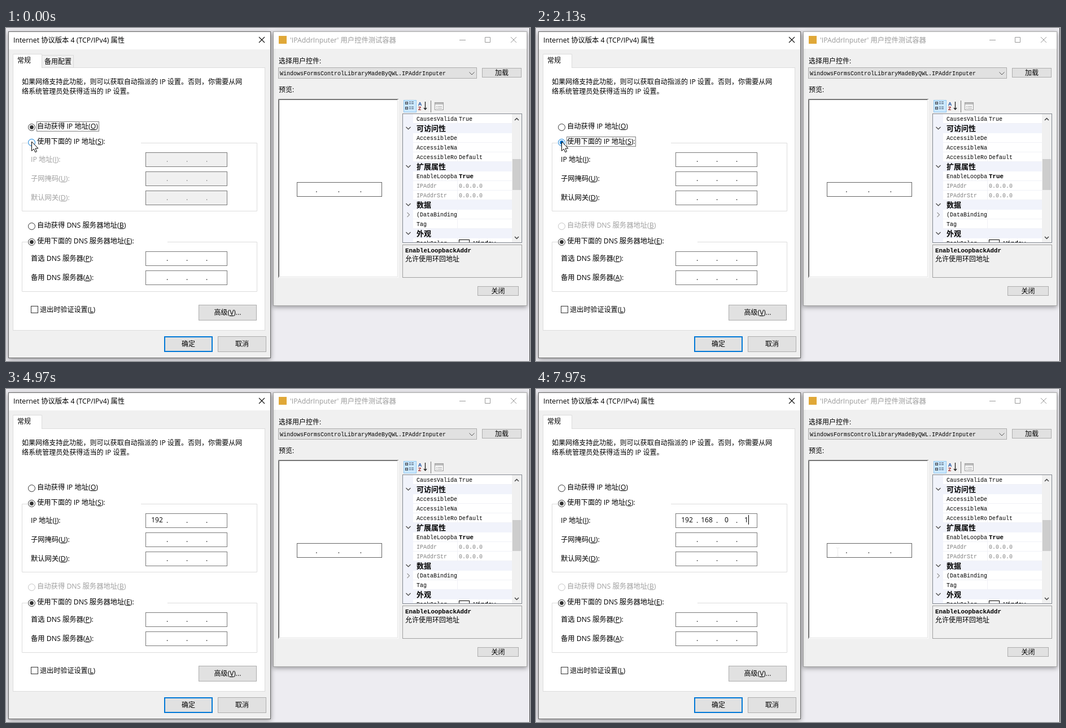
Recreate the animation shown at these times as an HTML page. Size 928 px wide and 592 px high, loop 8 s.

```html
<!DOCTYPE html>
<html lang="zh-CN">
<head>
<meta charset="utf-8">
<title>IP 设置</title>
<style>
  html, body { margin: 0; width: 100%; height: 100%; overflow: hidden; background: #edecf1; }
  svg { display: block; }
  text { font-family: "Open Sans", "Noto Sans CJK SC", "Noto Sans CJK", sans-serif; white-space: pre; }
  .mono { font-family: "Liberation Mono", "Noto Sans CJK SC", "Noto Sans CJK", monospace; }
  .u { text-decoration: underline; }
  .window { filter: drop-shadow(0 2px 4px #0006); }
</style>
</head>
<body>
<svg id="stage" width="928" height="592" viewBox="0 0 928 592"></svg>
<script>
const stage = document.getElementById('stage');
const ACCENT = '#0078d7', GREY = '#a0a0a0';

// Boxes are given by their outer pixel edges; strokes lie on pixel centres.
const fill = (x, y, w, h, color, extra = '') =>
  `<rect x="${x}" y="${y}" width="${w}" height="${h}" fill="${color}" ${extra}/>`;
const box = (x, y, w, h, color, stroke, extra = '') =>
  fill(x + .5, y + .5, w - 1, h - 1, color, `stroke="${stroke}" ${extra}`);
const path = (d, stroke, width = 1, extra = '') =>
  `<path d="${d}" fill="none" stroke="${stroke}" stroke-width="${width}" ${extra}/>`;

// Text is placed by its middle line; "_X" underlines X.
function label(x, middle, text, { size = 12.3, color = '#000', extra = '' } = {}) {
  const marked = text.replace(/_(\w)/g, '<tspan class="u">$1</tspan>');
  return `<text x="${x}" y="${middle + 4}" font-size="${size}" fill="${color}" ${extra}>${marked}</text>`;
}
const mono = (x, middle, text, { size = 10, color = '#000', extra = '' } = {}) =>
  label(x, middle - .5, text, { size, color, extra: 'class="mono" ' + extra });
const cjk = (x, middle, text, extra = '') =>
  label(x, middle + .5, text, { size: 12, extra });

function button(x, y, w, h, text, primary) {
  const frame = primary
    ? fill(x + 1, y + 1, w - 2, h - 2, '#e1e1e1', `stroke="${ACCENT}" stroke-width="2"`)
    : box(x, y, w, h, '#e1e1e1', '#adadad');
  return frame + label(x + w / 2, y + h / 2, text, { size: 12, extra: 'text-anchor="middle"' });
}

function radio(y, on, color = '#333') {
  return `<circle cx="45.5" cy="${y}" r="6" fill="#fff" stroke="${color}"/>` +
    (on ? `<circle cx="45.5" cy="${y}" r="3.4" fill="${color}"/>` : '');
}

const focusRect = (x, y, w, h) => box(x, y, w, h, 'none', '#000', 'stroke-dasharray="1 1"');

function ipField(y, enabled = true, parts = []) {
  const color = enabled ? '#000' : '#777';
  const middle = extra => ({ size: 12, color, extra: 'text-anchor="middle"' });
  return box(247, y, 145, 26, enabled ? '#fff' : '#f0f0f0', '#7a7a7a') +
    [285.5, 320.5, 355.5].map(x => label(x, y + 13, '.', middle())).join('') +
    parts.map((part, i) => label(267.5 + 35 * i, y + 12, part, middle())).join('');
}

function dialogFrame() {
  const group = (top, bottom, gap) =>
    path(`M38 ${top}.5H28.5V${bottom}.5H444.5V${top}.5H${gap}`, '#dcdcdc');
  return `<g class="window">${fill(4, 6, 465, 581, '#f0f0f0')}</g>` +
    box(4, 6, 465, 581, '#f0f0f0', '#666') + fill(5, 7, 463, 31, '#fff') +
    label(13, 22, 'Internet 协议版本 4 (TCP/IPv4) 属性') +
    path('M448 16l10 10m0-10l-10 10', '#111', 1.1) +
    box(12, 70, 447, 468, '#fff', '#dcdcdc') +
    path('M12.5 71V46.5H63.5V71', '#dcdcdc', 1, 'style="fill:#fff"') +
    fill(13, 69, 50, 3, '#fff') +
    label(20, 58, '常规', { size: 12 }) +
    label(28, 96, '如果网络支持此功能，则可以获取自动指派的 IP 设置。否则，你需要从网', { size: 12.06 }) +
    label(28, 113, '络系统管理员处获得适当的 IP 设置。', { size: 12.06 }) +
    group(204, 325, 239) + group(380, 468, 286) +
    label(55, 379, '使用下面的 DNS 服务器地址(_E):') + radio(380.5, true) +
    label(44, 410, '首选 DNS 服务器(_P):') + ipField(397) +
    label(44, 444, '备用 DNS 服务器(_A):') + ipField(431) +
    box(44, 494, 13, 13, '#fff', '#333') + label(60, 501, '退出时验证设置(_L)', { size: 12.1 }) +
    button(341, 492, 103, 28, '高级(_V)...') +
    button(280, 548, 86, 28, '确定', true) + button(375, 548, 86, 28, '取消');
}

function propertyGrid() {
  const rows = [
    ['CausesValida', 'True'], '可访问性', ['AccessibleDe'], ['AccessibleNa'],
    ['AccessibleRo', 'Default'], '扩展属性', ['EnableLoopba', 'True', 'bold'],
    ['IPAddr', '0.0.0.0', 'grey'], ['IPAddrStr', '0.0.0.0', 'grey'], '数据',
    ['(DataBinding'], ['Tag'], '外观', ['BackColor', '', 'swatch']
  ];
  const body = rows.map((row, i) => {
    const y = 161 + 17 * i;
    if (typeof row === 'string') {
      return fill(703, y - 8, 193, 17, '#f1f3fb') + path(`M708.5 ${y - 2}l4 4 4-4`, '#444', 1.2) +
        label(727, y + .5, row, { size: 13, extra: 'font-weight="700"' });
    }
    const [name, value = '', style] = row;
    const color = style === 'grey' ? '#808080' : '#000';
    const bold = { size: 10.83, extra: 'font-weight="700"' };
    return path(`M721 ${y + 8.5}H896M799.5 ${y - 8}V${y + 9}`, '#f0f1f7') +
      mono(727, y, name, { color }) +
      mono(802, y, value, style === 'bold' ? bold : { color }) +
      (style === 'swatch' ? box(802, y - 6, 19, 13, '#fff', '#000') + mono(828, y, 'Window', bold) : '');
  }).join('');
  return box(702, 152, 212, 230, '#fff', '#828790') +
    `<clipPath id="grid">${fill(703, 153, 193, 228, '#fff')}</clipPath>` +
    `<g clip-path="url(#grid)">${fill(703, 153, 18, 228, '#f1f3fb')}${body}</g>` +
    path('M710.5 328l4 4-4 4', '#999', 1.2) +
    fill(896, 153, 17, 228, '#f0f0f0') + fill(897, 233, 15, 55, '#cdcdcd') +
    path('M901 164l3.5-3.5 3.5 3.5M901 371l3.5 3.5 3.5-3.5', '#444', 1.5);
}

function toolbar() {
  const bullets = [133, 142].map(y => box(707, y - 2, 5, 5, '#fff', '#345') +
    path(`M708 ${y + .5}h3M714 ${y - 1.5}h3m1 0h4M714 ${y + 1.5}h3m1 0h4`, '#345')).join('');
  const letter = (y, char, color) => label(730, y, char, { size: 9, color, extra: 'font-weight="700"' });
  return box(704, 128, 23, 22, '#cce8ff', '#90c8f0') + bullets +
    letter(134, 'A', '#2458a8') + letter(142, 'Z', '#a02828') +
    path('M742.5 131V145m-2.5-3l2.5 3 2.5-3', '#222', 1.3) +
    path('M752.5 129V150', '#777') +
    box(759, 132, 16, 14, '#f4f4f4', '#a0a0a0') + fill(760, 133, 14, 3, '#bbb') +
    path('M762 139.5h2m1 0h7M762 142.5h2m1 0h7', '#aaa');
}

function testWindow() {
  return `<g class="window">${fill(473, 6, 450, 488, '#f0f0f0')}</g>` +
    box(473, 6, 450, 488, '#f0f0f0', '#aaa') + fill(474, 7, 448, 30, '#fff') +
    fill(483, 14, 14, 14, '#e0a838') +
    label(503, 22, "'IPAddrInputer' 用户控件测试容器", { color: '#999' }) +
    path('M803 21.5h11M848.5 16.5h9v9h-9zM894 16l10 10m0-10l-10 10', '#999') +
    cjk(483, 58, '选择用户控件:') +
    box(482, 70, 352, 20, '#e1e1e1', '#adadad') +
    mono(485, 80, 'WindowsFormsControlLibraryMadeByQWL.IPAddrInputer') +
    path('M820.5 78.5l4.5 4.5 4.5-4.5', '#555') +
    button(843, 71, 70, 17, '加载') +
    cjk(483, 109, '预览:') +
    fill(482, 126, 213, 318, '#fff') + path('M482.5 444V126.5H695', '#808080') +
    path('M483.5 443V127.5H694', '#696969') + path('M483 442.5H693.5V127', '#e3e3e3') +
    box(515, 274, 151, 26, '#fff', '#646464') +
    [550, 589.5, 628.5].map(x => label(x, 288, '.', { extra: 'text-anchor="middle"' })).join('') +
    toolbar() + propertyGrid() +
    box(702, 385, 212, 59, '#f0f0f0', GREY) +
    mono(707, 395, 'EnableLoopbackAddr', { size: 10.83, extra: 'font-weight="700"' }) +
    cjk(707, 410, '允许使用环回地址') +
    button(835, 459, 73, 17, '关闭');
}

const arrowCursor = (x, y) =>
  `<path transform="translate(${x} ${y})" d="M.5 0V16.5L4.3 13 6.8 18.8 9.4 17.7 7 12H12Z" fill="#fff" stroke="#000"/>`;
const textCursor = (x, y) =>
  path(`M${x - 3} ${y - 7.5}h2.5l.5 .5 .5-.5h2.5M${x} ${y - 7}v14M${x - 3} ${y + 7.5}h6`, '#ececec');

const SELECT = 1500, FOCUS = 3430;
// Time of each keystroke; the caret moves on after three digits or a dot.
const keys = [[3900, '1'], [4150, '9'], [4400, '2'], [5150, '1'], [5350, '6'], [5550, '8'],
  [5850, '0'], [6050, '.'], [6600, '1']];

function typedParts(t) {
  const parts = [''];
  let changed = FOCUS;
  for (const [time, key] of keys) {
    if (t < time) break;
    changed = time;
    if (key !== '.') parts[parts.length - 1] += key;
    if (key === '.' || parts[parts.length - 1].length === 3) parts.push('');
  }
  return { parts, changed };
}

// Waypoints: [time, x, y]
const pointer = [[0, 45, 202], [2550, 45, 202], [3030, 268, 231], [6950, 268, 231], [7750, 534, 290]];
function pointerAt(t) {
  const next = pointer.findIndex(p => p[0] > t);
  if (next < 0) return pointer.at(-1).slice(1);
  const [a, b] = [pointer[next - 1], pointer[next]];
  const u = (t - a[0]) / (b[0] - a[0]), e = u * u * (3 - 2 * u);
  return [1, 2].map(i => Math.round(a[i] + (b[i] - a[i]) * e));
}

function drawCursor(t) {
  if (t >= keys[0][0] && t < 6950) return '';
  const [x, y] = pointerAt(t);
  const inside = (left, top, w) => x >= left && x < left + w && y >= top && y < top + 26;
  return inside(247, 221, 145) || inside(515, 274, 151) ? textCursor(x + .5, y) : arrowCursor(x, y);
}

function drawState(t) {
  const manual = t >= SELECT, focused = t >= FOCUS;
  const hover = t < 2650 ? ACCENT : '#333';
  const color = manual ? '#000' : GREY;
  const { parts, changed } = typedParts(t);
  let out = radio(176.5, !manual) + label(55, 175, '自动获得 IP 地址(_O)') +
    radio(203.5, manual, hover) + label(55, 202, '使用下面的 IP 地址(_S):') +
    radio(352.5, false, manual ? '#c4c4c4' : '#333') +
    label(55, 351, '自动获得 DNS 服务器地址(_B)', { color: manual ? GREY : '#000' }) +
    label(44, 234, 'IP 地址(_I):', { color }) + ipField(221, manual, focused ? parts : []) +
    label(44, 268, '子网掩码(_U):', { color }) + ipField(255, manual) +
    label(44, 302, '默认网关(_D):', { color }) + ipField(289, manual);
  if (!manual) {
    out += box(63, 48, 57, 23, '#f0f0f0', '#d9d9d9') + label(68, 59.5, '备用配置', { size: 12 }) +
      focusRect(54, 166, 111, 18);
  } else if (!focused) {
    out += focusRect(54, 193, 123, 18);
  }
  if (focused && Math.floor((t - changed) / 530) % 2 === 0) {
    const i = parts.length - 1;
    out += fill(Math.round(302 + 35 * (i - 1) + parts[i].length * 3.6), 224, 1, 17, '#000');
  }
  return out + drawCursor(t);
}

stage.innerHTML = testWindow() + dialogFrame() + fill(927, 0, 1, 592, '#444') + '<g id="state"></g>';
const state = document.getElementById('state');
let shown = '';
function render() {
  const markup = drawState(performance.now() % 8000);
  if (markup !== shown) state.innerHTML = shown = markup;
  requestAnimationFrame(render);
}
render();
</script>
</body>
</html>
```
